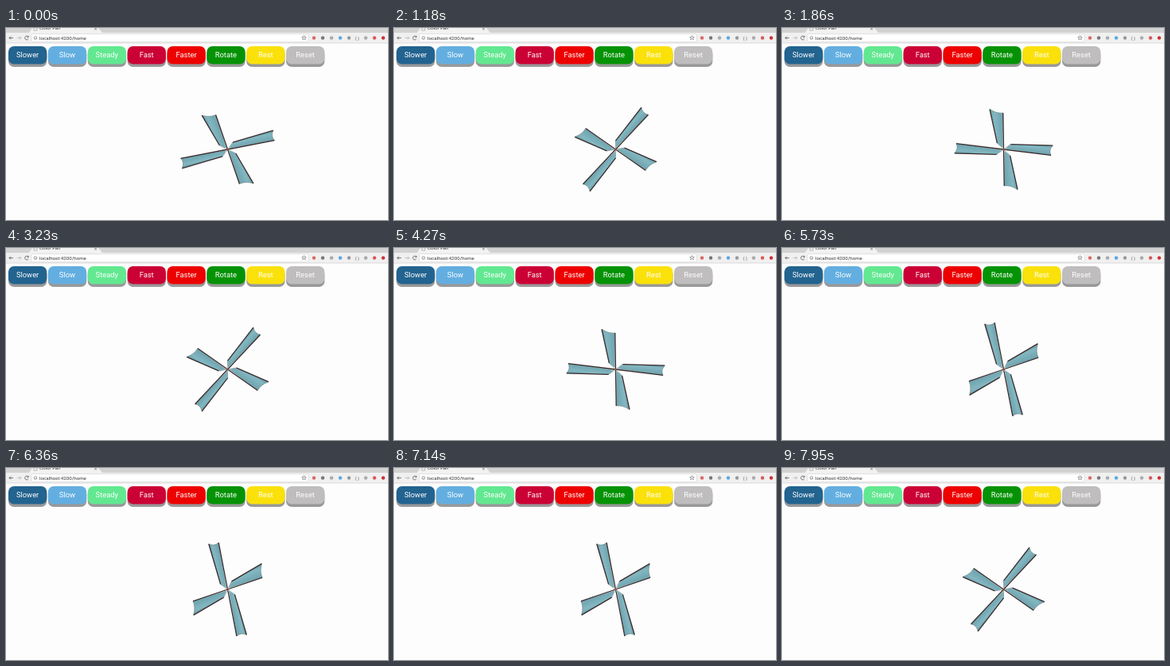
These frames come from a looping animation (480 by 242 pixels, 8000 ms). An HTML page:

```html
<!DOCTYPE html>
<html lang="en">
<head>
<meta charset="utf-8">
<title>Fan</title>
<style>
  html, body { margin: 0; width: 100%; height: 100%; overflow: hidden; background: #fdfdfd; }
  svg { display: block; width: 480px; height: 242px; }
  text { font-family: Roboto, "Liberation Sans", sans-serif; }
  #buttons text { font-size: 9.4px; fill: #fff; text-anchor: middle; }
  .panel { fill: url(#glass); }
  .edge { fill: none; stroke: #3a2a2b; stroke-width: 1.3; }
  .rim { fill: none; stroke: #6d7f83; stroke-width: .6; }
</style>
</head>
<body>
<svg viewBox="0 0 480 242">
  <defs>
    <linearGradient id="glass" x1="0" y1="0" x2=".15" y2="1">
      <stop offset="0" stop-color="#568f9b"/>
      <stop offset=".45" stop-color="#83b7c1"/>
      <stop offset="1" stop-color="#70a5b0"/>
    </linearGradient>
    <g id="longBlade">
      <path class="panel" d="M2-1L8-7.5L60.7-12.5Q56-6 60 0Z"/>
      <path class="rim" d="M1-1L8-7.5M60.7-12.5Q56-6 60 0"/>
      <path class="edge" d="M8-7.5L60.7-12.5M0 0H60"/>
    </g>
    <g id="shortBlade">
      <path class="panel" d="M2-1L8-8L51-16.7Q45-8 46 0Z"/>
      <path class="rim" d="M1-1L8-8M51-16.7Q45-8 46 0"/>
      <path class="edge" d="M8-8L51-16.7M0 0H46"/>
    </g>
  </defs>

  <g id="browser">
    <rect width="480" height="6" fill="#d3d2d3"/>
    <path d="M29 6L33 0H116L121 6Z" fill="#f3f2f3"/>
    <path d="M35 0h4v3h-4z" fill="#fff" stroke="#888" stroke-width=".6"/>
    <text x="42" y="2.4" font-size="6.2" fill="#333">Color Fan</text>
    <path d="M111 0l3 2.5m0-2.5l-3 2.5" stroke="#777" stroke-width=".7"/>
    <rect y="6" width="480" height="13" fill="#f1f0f1"/>
    <rect x="32" y="7.5" width="348" height="10" rx="1.5" fill="#fff" stroke="#cfcfcf" stroke-width=".5"/>
    <g fill="none" stroke="#666" stroke-width=".9">
      <path d="M9 12.5H4m2-2l-2 2l2 2"/>
      <path d="M14 12.5h5m-2-2l2 2l-2 2" stroke="#bbb"/>
      <path d="M28 11.3a2.3 2.3 0 1 0 .1 2.2M28.2 9.8v1.7h-1.7"/>
      <circle cx="37" cy="12.5" r="1.9" stroke-width=".6"/>
      <path d="M37 12.2v1.4" stroke-width=".6"/>
    </g>
    <text x="42" y="14.8" font-size="6.2" fill="#333">localhost:4200/home</text>
    <path d="M374.5 9.5l.8 2h2l-1.6 1.3l.6 2l-1.8-1.2l-1.8 1.2l.6-2l-1.6-1.3h2z" fill="none" stroke="#666" stroke-width=".6"/>
    <path d="M0 19H480" stroke="#c9c8c9" stroke-width=".6"/>
  </g>
  <g id="buttons"></g>
  <g id="fan">
    <use href="#longBlade"/>
    <use href="#longBlade" transform="rotate(180)"/>
    <use href="#shortBlade" transform="rotate(82)"/>
    <use href="#shortBlade" transform="rotate(262)"/>
    <circle r="1.3" fill="#8c5545"/>
  </g>
</svg>
<script>
const LOOP = 8000, FRAMES = 176, STEP = 18, REST_ANGLE = -10.9;

// Time in ms and the number of 18 degree steps turned by then.
const turns = [[820, 0], [1863.6, 81], [3227.3, 188], [4272.7, 271],
               [5090.9, 334], [6363.6, 435], [7954.5, 558]];

function add(parent, tag, attrs, label = '') {
  const node = document.createElementNS('http://www.w3.org/2000/svg', tag);
  for (const name in attrs) node.setAttribute(name, attrs[name]);
  node.textContent = label;
  parent.append(node);
}

const buttons = document.getElementById('buttons');
[['Slower', '#22638f'], ['Slow', '#63aee0'], ['Steady', '#62e890'], ['Fast', '#cb0035'],
 ['Faster', '#ed0000'], ['Rotate', '#059305'], ['Rest', '#fae10a'], ['Reset', '#bfbdbe']
].forEach(([label, fill], i) => {
  const x = 3 + i * 49.86;
  add(buttons, 'rect', { x, y: 26, width: 48.3, height: 23, rx: 7, fill: '#999' });
  add(buttons, 'rect', { x, y: 23, width: 48.3, height: 22.5, rx: 7, fill });
  add(buttons, 'text', { x: x + 24.1, y: 37.4 }, label);
});

const browser = document.getElementById('browser');
['#d96b66', '#777', '#aaa', '#5ca9dc', '#999', '#aaa', '#d75a5a', '#cc3434'].forEach((fill, i) =>
  add(browser, 'circle', { cx: [387, 398, 409, 420, 431, 452, 463, 474][i], cy: 12.5, r: 2.2, fill }));
add(browser, 'text', { x: 438.5, y: 14.7, 'font-size': 6, fill: '#777' }, '{ }');

function stepsAt(time) {
  if (time <= turns[0][0]) return 0;
  let i = turns.findIndex(([end]) => time <= end);
  if (i < 0) i = turns.length - 1;
  const [t0, a] = turns[i - 1], [t1, b] = turns[i];
  return Math.round(a + (b - a) * (time - t0) / (t1 - t0));
}

const fan = document.getElementById('fan');
let start;
function draw(now) {
  start ??= now;
  const frame = Math.floor(((now - start) % LOOP + 5) * FRAMES / LOOP) % FRAMES;
  const angle = REST_ANGLE + STEP * stepsAt(frame * LOOP / FRAMES);
  fan.setAttribute('transform', `translate(278.5 153) rotate(${angle})`);
  requestAnimationFrame(draw);
}
requestAnimationFrame(draw);
</script>
</body>
</html>
```
